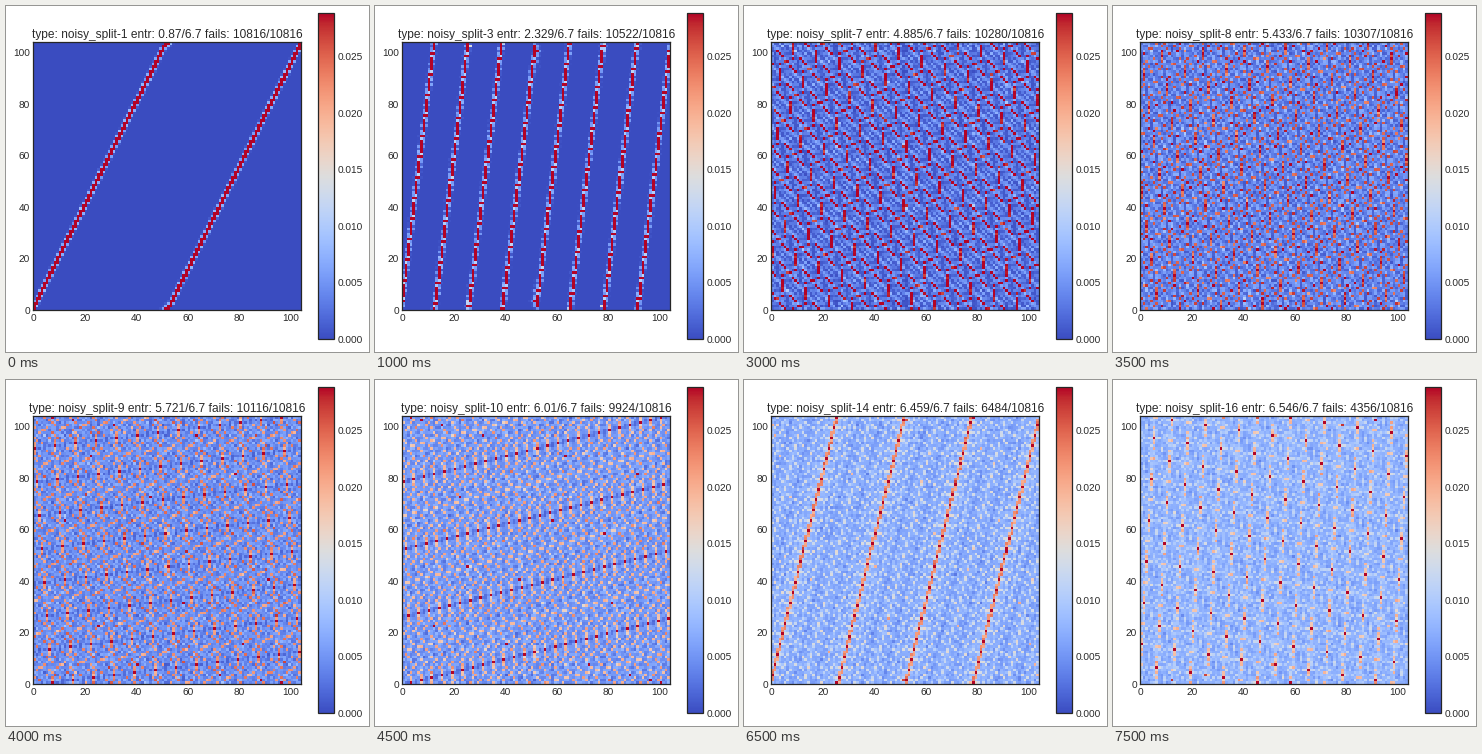
A matplotlib script that plays this animation: 363x346 px, repeating every 8 s.

```python
import numpy as np
import matplotlib.pyplot as plt
from matplotlib.animation import FuncAnimation

W, H, DPI = 363, 346, 72
CARDS, HALF, TRIALS, STEPS = 104, 52, 10000, 16
SLIP = 0.089  # each further card the cut is off is this much rarer
INK = "0.15"

# Shuffles: (entropy, failed tests), linear in between
SCORES = {1: (0.87, 10816), 5: (3.788, 10227), 8: (5.433, 10307),
          10: (6.01, 9924), 12: (6.336, 8640), 14: (6.459, 6484),
          16: (6.546, 4356)}

plt.rcParams.update({
    "font.family": "Liberation Sans",
    "font.size": 10,
    "text.color": INK,
    "text.hinting": "native",
    "axes.edgecolor": INK,
    "axes.linewidth": 1.25,
    "xtick.color": INK,
    "ytick.color": INK,
    "xtick.major.size": 0,
    "ytick.major.size": 0,
    "xtick.major.pad": 3.5,
    "ytick.major.pad": 3.5,
})


def riffle(miss):
    """New place of every card after a perfect riffle of an uneven cut."""
    card = np.arange(CARDS)
    key = np.where(card < HALF + miss, 2 * card + 1, 2 * (card - HALF))
    return np.argsort(np.argsort(key))


def step_matrix():
    """Odds of going from one place to another in one shuffle."""
    step = np.zeros((CARDS, CARDS))
    for miss in range(-3, 4):
        step[np.arange(CARDS), riffle(miss)] += SLIP ** abs(miss)
    return step / step.sum(axis=1, keepdims=True)


def observed(step, count):
    """Frequencies of start and end places over many trials."""
    rng = np.random.default_rng(100 + count)
    odds = np.linalg.matrix_power(step, count)
    odds /= odds.sum(axis=1, keepdims=True)
    return rng.multinomial(TRIALS, odds).T / TRIALS


def caption(count):
    entropy, fails = (np.interp(count, list(SCORES), column)
                      for column in zip(*SCORES.values()))
    return (f"type: noisy_split-{count} entr: {round(float(entropy), 3)}/6.7 "
            f"fails: {fails:.0f}/{CARDS ** 2}")


def place(left, top, width, height):
    """Axes at a box given in pixels from the top left."""
    return fig.add_axes([left / W, 1 - (top + height) / H,
                         width / W, height / H])


step = step_matrix()
grids = [observed(step, k + 1) for k in range(STEPS)]

fig = plt.figure(figsize=(W / DPI, H / DPI), dpi=DPI, facecolor="white")
ax = place(27.3, 36.36, 267.84, 267.84)
bar_ax = place(311.9, 7.2, 16.31, 326.16)

image = ax.imshow(grids[0], cmap="coolwarm", vmin=0, vmax=3 / CARDS,
                  origin="lower", extent=(0, CARDS, 0, CARDS),
                  interpolation="nearest", aspect="auto")
ax.set_xticks(range(0, CARDS, 20))
ax.set_yticks(range(0, CARDS, 20))
title = ax.set_title("", fontsize=12, pad=5)

bar = fig.colorbar(image, cax=bar_ax, ticks=np.arange(6) * 0.005,
                   format="%.3f")
bar.outline.set_linewidth(1.25)


def update(i):
    image.set_data(grids[i])
    title.set_text(caption(i + 1))
    return image, title


anim = FuncAnimation(fig, update, frames=STEPS, interval=500,
                     repeat=True, repeat_delay=0, blit=False)
plt.show()
```
